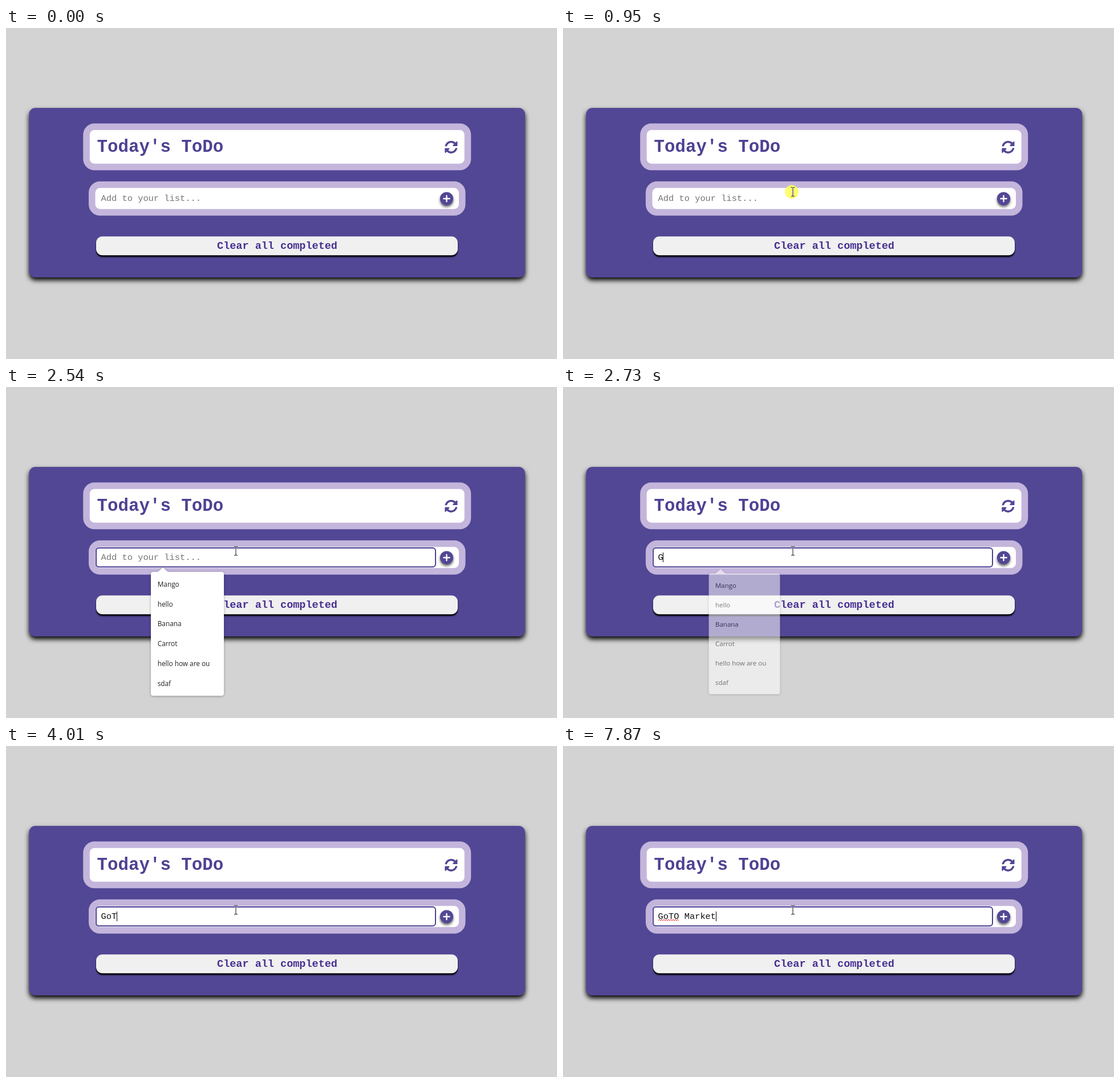
Recreate the animation shown at these times as an HTML page. Size 966 px wide and 580 px high, loop 8 s.

```html
<!DOCTYPE html>
<html lang="en">
<head>
<meta charset="utf-8">
<title>Today's ToDo</title>
<style>
html, body { margin: 0; width: 966px; height: 580px; overflow: hidden; background: #d3d3d3; }
svg { display: block; }
text { font-family: "Liberation Mono", "Courier New", monospace; white-space: pre; }
.bold { font-weight: bold; fill: #4d4293; }
.purple { fill: #524795; }
.frame { fill: #fff; stroke: #c3b5db; stroke-width: 11.5; }
.panel { filter: drop-shadow(0 5.5px 4.2px #000); }
.add { filter: drop-shadow(0 3px 2px rgba(0, 0, 0, .6)); }
.bar { fill: #f0f0f0; filter: drop-shadow(0 3px 1.3px #000); }
#menu { filter: drop-shadow(0 1px 2px rgba(0, 0, 0, .3)); transform-origin: 318px 432px; }
#menu text { font: 11.8px "Open Sans", "Noto Sans", sans-serif; fill: #222; }
#clear { transform-origin: 475px 382px; }
</style>
</head>
<body>
<svg width="966" height="580" viewBox="0 0 966 580">
  <defs>
    <path id="half" d="M370.7 133.3C339.5 104 298.900 88 255.800 88c-77.400 0-144.300 53.200-162.800 126.900-1.300 5.300-6.100 9.100-11.600 9.100H24.100c-7.500 0-13.200-6.800-11.800-14.200C33.900 94.900 134.800 8 256 8c66.400 0 126.800 26.100 171.300 68.700L463 41c15.100-15.100 41-4.400 41 17V192c0 13.300-10.700 24-24 24H346c-21.400 0-32.100-25.900-17-41z"/>
  </defs>
  <rect class="purple panel" x="40.500" y="140" width="869.500" height="297" rx="11"/>

  <rect class="frame" x="141" y="173" width="668.500" height="70.500" rx="14"/>
  <text class="bold" x="159.500" y="217" font-size="30.8">Today's ToDo</text>
  <g class="purple" transform="translate(780.4 208.800) scale(.0447) translate(-256 -256)">
    <use href="#half"/>
    <use href="#half" transform="rotate(180 256 256)"/>
  </g>

  <rect class="frame" x="150.750" y="274.500" width="649" height="48.500" rx="14"/>
  <rect id="ring" x="158" y="282" width="595" height="33.300" rx="5" fill="#fff" stroke="#4b4094" stroke-width="2"/>
  <text id="entry" x="166.500" y="303" font-size="15.4"></text>
  <path id="squiggle" fill="none" stroke="#e02020" stroke-width="1"/>
  <rect id="caret" y="290" width="1" height="17"/>
  <circle class="purple add" cx="772.500" cy="299" r="11.6"/>
  <path d="M767.300 299h10.400M772.500 293.800v10.400" stroke="#fff" stroke-width="2.300" stroke-linecap="round"/>

  <g id="clear">
    <rect class="bar" x="158" y="365.300" width="634" height="33" rx="11"/>
    <text class="bold" x="475.500" y="387" font-size="18.5" text-anchor="middle" style="fill:#472f90">Clear all completed</text>
  </g>

  <g id="menu">
    <path d="M258 324H266L275 316.500L284 324H378a4 4 0 0 1 4 4V537a4 4 0 0 1-4 4H258a4 4 0 0 1-4-4V328a4 4 0 0 1 4-4z" fill="#fff"/>
  </g>

  <circle id="click" cx="401" cy="287" r="12" fill="#ffff50" opacity=".8"/>
  <g id="pointer">
    <path id="arrow" d="M0 0V16L3.700 12.600L6.200 18.500L8.600 17.500L6.100 11.700H11.300z" fill="#fff" stroke="#000"/>
    <path id="hand" d="M-1.500 1.500a1.500 1.500 0 0 1 3 0V7L8 8.500Q10 9 10 11V14L8 19H-1L-6 12Q-5-1 10-1.500 12z" fill="#fff" stroke="#000"/>
    <g id="beam" fill="none">
      <path d="M0-7V8" stroke="#fff" stroke-width="3" opacity=".6"/>
      <path d="M-3-7.500H-1L0-6.500L1-7.500H3M0-6.500V7M-3 8H-1L0 7L1 8H3" stroke="#111"/>
    </g>
  </g>
</svg>
<script>
const LOOP = 8000, TEXT_X = 166.5, ADVANCE = 9.24;
const PHRASE = "GoTO Market";
const keyTimes = [2670, 2930, 4010, 4280, 5340, 5940, 6070, 6340, 6740, 6870, 7870];
const caretOff = [[0, 1020], [1480, 2010], [2540, 2670], [3480, 4010], [4810, 5340], [5870, 5940], [7410, 7870]];
const menuFade = [[0, 0], [1020, .5], [1080, 1], [2670, .85], [2730, .55], [2800, .25], [2870, .08], [2930, 0]];

const $ = id => document.getElementById(id);
const show = (id, on) => $(id).setAttribute("visibility", on ? "visible" : "hidden");
const within = (t, [a, b]) => t >= a && t < b;

["Mango", "hello", "Banana", "Carrot", "hello how are ou", "sdaf"].forEach((word, i) => {
  const item = document.createElementNS("http://www.w3.org/2000/svg", "text");
  item.setAttribute("x", 265.7);
  item.setAttribute("y", 349.8 + 34.8 * i);
  item.textContent = word;
  $("menu").append(item);
});

let wave = "M167 306";
for (let x = 169; x <= 203; x += 2) wave += `L${x} ${x % 4 === 1 ? 304 : 306}`;
$("squiggle").setAttribute("d", wave);

// The mouse glides up from below the panel into the input.
function drawPointer(t) {
  const p = Math.min(8, Math.max(0, Math.floor((t - 190) / 70))) / 8;
  const left = 1 - p * (2 - p);
  const x = 403 + 27 * left, y = 287 + 218 * left;
  const visible = t >= 190, onInput = y < 317, onClear = y > 365 && y < 399;
  $("pointer").setAttribute("transform", `translate(${x} ${y})`);
  show("beam", visible && onInput);
  show("hand", visible && onClear);
  show("arrow", visible && !onInput && !onClear);
  show("click", within(t, [950, 1080]));
  $("clear").style.transform = `scale(${visible && onClear ? 1.01 : 1})`;
}

function draw(t) {
  const count = keyTimes.filter(k => t >= k).length;
  $("entry").textContent = count ? PHRASE.slice(0, count) : "Add to your list...";
  $("entry").setAttribute("fill", count ? "#111" : "#757575");
  $("caret").setAttribute("x", Math.floor(TEXT_X + count * ADVANCE));
  show("caret", !caretOff.some(span => within(t, span)));
  show("squiggle", t >= 5410);
  show("ring", t >= 1020);

  const alpha = menuFade.filter(([at]) => t >= at).pop()[1];
  $("menu").style.opacity = alpha;
  $("menu").style.transform = `scale(${.945 + .055 * alpha})`;
  drawPointer(t);
}

const start = performance.now();
function tick() {
  draw((performance.now() - start) % LOOP);
  requestAnimationFrame(tick);
}
tick();
</script>
</body>
</html>
```
